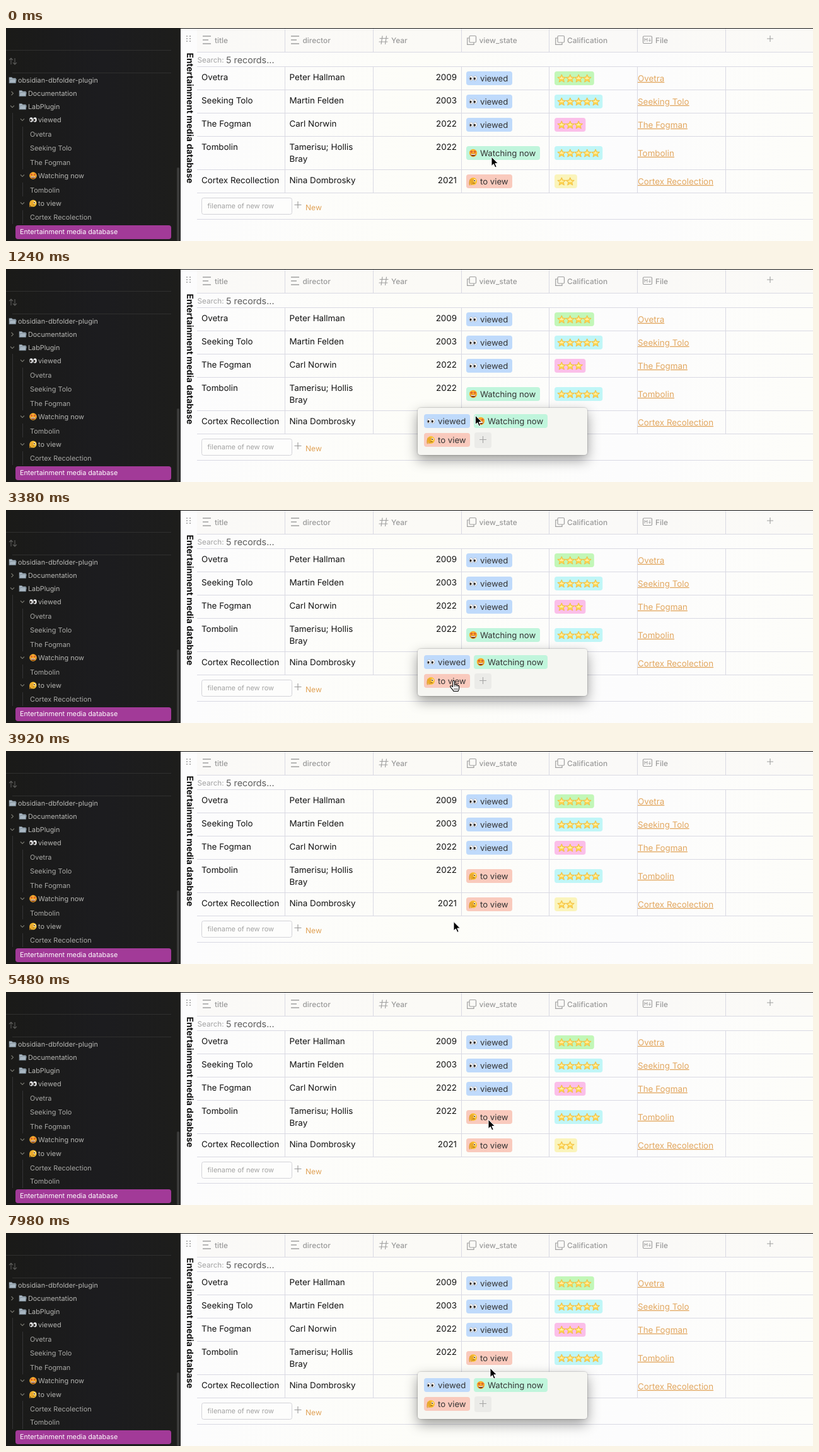
Animation, 1280 px wide and 339 px high, one loop 8 s. Source, as an HTML page:

```html
<!DOCTYPE html>
<html lang="en">
<head>
<meta charset="utf-8">
<title>Media database</title>
<style>
  html, body { margin: 0; width: 100%; height: 100%; overflow: hidden; background: #fdfdfb; }
  svg { display: block; width: 1280px; height: 339px; }
  text { font-family: Inter, Roboto, sans-serif; text-rendering: geometricPrecision; white-space: pre; }
</style>
</head>
<body>
<svg id="stage" viewBox="0 0 1280 339" xmlns="http://www.w3.org/2000/svg">
  <defs>
    <linearGradient id="pane">
      <stop offset="0" stop-color="#fcfcfd"/><stop offset=".4" stop-color="#fdfdf8"/>
      <stop offset=".7" stop-color="#fcfcfd"/><stop offset="1" stop-color="#fdfdf9"/>
    </linearGradient>
    <linearGradient id="side">
      <stop offset="0" stop-color="#1a1a18"/><stop offset=".55" stop-color="#1c1c1f"/>
      <stop offset="1" stop-color="#1d1d1b"/>
    </linearGradient>
    <filter id="shade" x="-20%" y="-60%" width="140%" height="240%">
      <feDropShadow dx="0" dy="0" stdDeviation=".8" flood-color="#000" flood-opacity=".35"/>
      <feDropShadow dx="0" dy="8" stdDeviation="10" flood-color="#000" flood-opacity=".38"/>
    </filter>
    <g id="eyes">
      <g fill="#fff" stroke="#8b8f96" stroke-width=".5">
        <ellipse cx="-3.2" cy="0" rx="2.9" ry="4"/><ellipse cx="3.2" cy="0" rx="2.9" ry="4"/>
      </g>
      <ellipse cx="-4" cy=".6" rx="1.5" ry="2.1" fill="#2a2522"/>
      <ellipse cx="2.4" cy=".6" rx="1.5" ry="2.1" fill="#2a2522"/>
    </g>
    <path id="spark" d="M0-2.7.7-.9 2.7-.8 1.2.4 1.7 2.2 0 1.2-1.7 2.2-1.2.4-2.7-.8-.7-.9Z"/>
    <g id="wow">
      <circle r="6.2" fill="#fbb02c"/>
      <path d="M-4.2.9Q0 2 4.2.9Q3.8 5.2 0 5.2T-4.2.9Z" fill="#7a3516"/>
      <path d="M-3.7 1.3Q0 2.3 3.7 1.3L3.2 3H-3.2Z" fill="#fff"/>
      <use href="#spark" x="-2.7" y="-2" fill="#d9612b"/><use href="#spark" x="2.7" y="-2" fill="#d9612b"/>
    </g>
    <g id="peek">
      <circle r="6" fill="#fbc233"/>
      <ellipse cx="2.4" cy="-1.2" rx="1.7" ry="2" fill="#fff"/><circle cx="2.2" cy="-1" r="1.1" fill="#55300e"/>
      <path d="M-1 3.2Q.8 2.4 2.6 3.2" fill="none" stroke="#70400f"/>
      <path d="M-5.5 5.8Q-6.6 1-4.5-3M-3.2 5.6Q-3.8 0-2-4.2M-1 4.6Q-1.8 0 .2-3" fill="none" stroke="#dd9a2a" stroke-width="1.3" stroke-linecap="round"/>
    </g>
    <g id="star">
      <path d="M0-6.4 1.9-2.2 6.5-1.8 3 1.3 4.1 5.8 0 3.4-4.1 5.8-3 1.3-6.5-1.8-1.9-2.2Z" fill="#fdd651" stroke="#f0b63a" stroke-width=".8" stroke-linejoin="round"/>
      <path d="M0-3.6 1.2-1 4-.8 1.9 1 0 .8-1.9 1-4-.8-1.2-1Z" fill="#fff0a8"/>
    </g>
    <path id="folder" d="M-5.5-4.6H-1.3L0-3.1H5V4.6H-5.5ZM-4-1.4H6L4.9 4.6H-5.5Z" fill="#a9b7c2" stroke="#6f7d88" stroke-width=".6"/>
  </defs>
</svg>
<script>
const stage = document.getElementById('stage');
const LOOP = 8000, OPEN_1 = 420, CLOSE = 3720, MOVE = 4180, OPEN_2 = 7060;

const text = (x, mid, str, size, fill, extra = '') =>
  `<text x="${x}" y="${mid + size * 0.36}" font-size="${size}" fill="${fill}" ${extra}>${str}</text>`;
const rect = (x, y, w, h, fill, r = 0, extra = '') =>
  `<rect x="${x}" y="${y}" width="${w}" height="${h}" rx="${r}" fill="${fill}" ${extra}/>`;
const path = (d, color, width = 1, extra = '') =>
  `<path d="${d}" fill="none" stroke="${color}" stroke-width="${width}" ${extra}/>`;
const icon = (id, x, y, scale = 1) =>
  `<use href="#${id}" transform="translate(${x} ${y}) scale(${scale})"/>`;
const plus = (x, y, r, color) => path(`M${x - r} ${y}H${x + r}M${x} ${y - r}V${y + r}`, color, 1.1);

const STATES = {
  viewed: { label: 'viewed', icon: 'eyes', color: '#bfdafb', width: 73 },
  now: { label: 'Watching now', icon: 'wow', color: '#c0f5dc', width: 117 },
  later: { label: 'to view', icon: 'peek', color: '#f9cabd', width: 73 }
};

const tag = (key, x, mid) => {
  const s = STATES[key];
  return rect(x, mid - 11, s.width, 22, s.color, 4) + icon(s.icon, x + 11, mid) +
    text(x + 22, mid, s.label, 13.2, '#333');
};

const stars = (n, mid, color) => {
  let out = rect(870, mid - 11, 9 + n * 13.45, 22, color, 4);
  for (let i = 0; i < n; i++) out += icon('star', 881.3 + i * 13.45, mid + 0.3);
  return out;
};

// Sidebar
const chevron = (x, y, open) =>
  path(open ? `M${x - 3} ${y - 1.5}l3 3 3-3` : `M${x - 1.5} ${y - 3}l3 3-3 3`, '#77776f', 1.1);
const guide = (x, y1, y2) => path(`M${x + .5} ${y1}V${y2}`, '#343436');
const leaf = (y, name) => text(38, y, name, 10.9, '#a9a9a6');
const group = (key, y) => chevron(26, y, true) + icon(STATES[key].icon, 43, y, .93) +
  text(51, y, STATES[key].label, 10.9, '#b4b4b1');
const root = (x, y, name) => icon('folder', x - 8.5, y) + text(x, y, name, 10.8, '#b9b9b6');

function sidebar() {
  return rect(0, 0, 277, 339, 'url(#side)') + rect(275, 0, 2, 339, '#252525') +
    path('M0 35.5H262M10 71.5H262', '#30302f') +
    path('M8 58V48M5 51l3-3 3 3M14 48V58M11 55l3 3 3-3', '#5c5c5a', 1.1) +
    root(19, 83, 'obsidian-dbfolder-plugin') +
    chevron(10, 104, false) + root(35, 104, 'Documentation') +
    chevron(10, 125, true) + root(35, 125, 'LabPlugin') +
    guide(10, 135, 312) + guide(26, 157, 225) +
    group('viewed', 146) + leaf(169, 'Ovetra') + leaf(191, 'Seeking Tolo') + leaf(214, 'The Fogman') +
    group('now', 235) +
    `<g id="treeA">${guide(26, 246, 268) + leaf(258, 'Tombolin') + group('later', 279) +
      guide(26, 290, 312) + leaf(301, 'Cortex Recolection')}</g>` +
    `<g id="treeB">${group('later', 257) + guide(26, 267, 312) +
      leaf(280, 'Cortex Recolection') + leaf(301, 'Tombolin')}</g>` +
    rect(15, 314, 247, 22, '#a23a98', 4) +
    text(22, 324, 'Entertainment media database', 10.8, '#fff') +
    rect(271, 222, 4, 117, '#3a3a39', 2);
}

// Table
const ROWS = [
  { y: 78, tagY: 80, title: 'Ovetra', by: ['Peter Hallman'], year: 2009, state: 'viewed', n: 4, color: '#c2f7b8' },
  { y: 115.5, tagY: 117, title: 'Seeking Tolo', by: ['Martin Felden'], year: 2003, state: 'viewed', n: 5, color: '#c0f6f7' },
  { y: 152, tagY: 154, title: 'The Fogman', by: ['Carl Norwin'], year: 2022, state: 'viewed', n: 3, color: '#fbbfe9' },
  { y: 189, tagY: 199, title: 'Tombolin', by: ['Tamerisu; Hollis', 'Bray'], year: 2022, n: 5, color: '#c0f6f7' },
  { y: 242, tagY: 244, title: 'Cortex Recollection', file: 'Cortex Recolection', by: ['Nina Dombrosky'], year: 2021, state: 'later', n: 2, color: '#faf4bb' }
];

function header() {
  const ink = '#a0a0a0';
  const lines = x => path(`M${x} 13h13M${x} 19h9M${x} 25h13`, ink, 1.4);
  const copies = x => rect(x + 4, 12.5, 10.5, 10.5, 'none', 1.5, `stroke="${ink}" stroke-width="1.2"`) +
    path(`M${x + 4} 16H${x + .7}V26.3H${x + 11}V23`, ink, 1.2);
  let dots = '';
  for (let i = 0; i < 6; i++) dots += rect(286 + i % 2 * 5, 12 + (i >> 1) * 4, 2, 2, '#9a9a9a', 1);
  const label = (x, s) => text(x, 20, s, 11.9, '#9a9a9a', 'font-weight="500"');
  return dots + lines(312) + label(331, 'title') + lines(452) + label(470.5, 'director') +
    path('M597 12.5l-2 13.5M603.5 12.5l-2 13.5M592.5 16.5h14M591.5 22h14', ink, 1.2) + label(611, 'Year') +
    copies(731) + label(750.5, 'view_state') + copies(871) + label(890, 'Calification') +
    rect(1010.5, 13, 14, 11.5, 'none', 1.5, `stroke="${ink}" stroke-width="1.2"`) +
    path('M1013 21.5V16.5l2 2.5 2-2.5V21.5M1021 16.5V21M1019.3 19.4l1.7 1.8 1.7-1.8', ink, 1) +
    label(1030, 'File') + plus(1212, 17, 5, ink);
}

function table() {
  let out = rect(277, 0, 1003, 339, 'url(#pane)') + rect(303, 1, 977, 37, '#faf9f6', 0, 'fill-opacity=".6"');
  const line = '#d9d9e3';
  for (const y of [38, 61, 98, 135, 172, 225, 262, 304]) out += path(`M303 ${y + .5}H1280`, line);
  for (const x of [442, 582, 722, 861, 1001, 1141]) out += path(`M${x + .5} 1V38M${x + .5} 61V262`, line);
  out += header() +
    `<text transform="translate(287 39.5) rotate(90)" font-size="13.9" font-weight="700" fill="#111">Entertainment media database</text>` +
    text(303.5, 51, 'Search:', 11.7, '#a2a2a2') + text(349, 51, '5 records...', 14.3, '#5c5c5c');
  for (const r of ROWS) {
    out += text(310, r.y, r.title, 13.4, '#111') +
      r.by.map((s, i) => text(449.5, r.y + i * 19, s, 13.4, '#111')).join('') +
      text(715, r.y, r.year, 13.4, '#111', 'text-anchor="end"') +
      (r.state ? tag(r.state, 730, r.tagY)
        : `<g id="cellA">${tag('now', 730, r.tagY)}</g><g id="cellB">${tag('later', 730, r.tagY)}</g>`) +
      stars(r.n, r.tagY, r.color) +
      text(1002, r.tagY, r.file || r.title, 13.4, '#e2a75f', 'text-decoration="underline"');
  }
  return out + rect(310.5, 270.5, 143, 26, '#fdfdfc', 3, 'stroke="#d3d3d8"') +
    text(319.5, 283.5, 'filename of new row', 11, '#a3a3a3') +
    plus(463, 281.5, 5.5, '#999') + text(475, 286, 'New', 12.1, '#e0a256') +
    rect(0, 0, 1280, 1, '#111');
}

const popup = () => `<g id="popup">${
  rect(653, 221, 269, 75, '#f6f6f2', 5, 'filter="url(#shade)"') +
  tag('viewed', 663, 242) + tag('now', 742, 242) + tag('later', 663, 272) +
  rect(743, 260, 27, 25, '#ebebe8', 4) + plus(756.5, 271.5, 5.5, '#a5a5a5')}</g>`;

const pointers = () =>
  `<g id="arrow"><path d="M0 0V14.6L3.4 11.5 5.8 17 8.2 16 5.8 10.6H10.4Z" fill="#000" stroke="#fff" stroke-width="1" stroke-linejoin="round"/></g>
   <g id="hand"><path d="M-1.4 10V1.5Q-1.4 0 0 0T1.4 1.5V6.3Q3.6 5.3 4 7Q6 6.2 6.4 7.8Q8.6 7.4 8.6 9.4V12Q8.4 15 7 17H0Q-1.4 14.6-3.6 12.2Q-6.2 9.4-5 8.5Q-3.6 7.6-1.4 10Z" fill="#fff" stroke="#000" stroke-width="1.1" stroke-linejoin="round"/><path d="M1.4 6.3V9.5M4 7V9.8M6.4 7.8V10M1 12V15M3.3 12V15M5.6 12V15" stroke="#000" stroke-width=".8"/></g>`;

stage.insertAdjacentHTML('beforeend', table() + sidebar() + popup() + pointers());

// Pointer stops: time, x, y
const STOPS = [
  [0, 770, 205], [700, 769.5, 205], [950, 769.5, 205], [1600, 710, 271.5],
  [4050, 710, 271.5], [4450, 732, 253], [4700, 732, 253], [5400, 765, 203],
  [7300, 765, 203], [7900, 768, 215], [LOOP, 768, 215]
];

function pointerAt(t) {
  const i = STOPS.findIndex(s => s[0] > t);
  const [t0, x0, y0] = STOPS[i - 1], [t1, x1, y1] = STOPS[i];
  const p = (t - t0) / (t1 - t0), k = p * p * (3 - 2 * p);
  return [x0 + (x1 - x0) * k, y0 + (y1 - y0) * k];
}

const part = id => document.getElementById(id);
const show = (id, on) => part(id).setAttribute('display', on ? 'inline' : 'none');

function draw(now) {
  const t = now % LOOP;
  const open = (t >= OPEN_1 && t < CLOSE) || t >= OPEN_2;
  const [x, y] = pointerAt(t);
  const hover = open && x > 663 && x < 736 && y > 261 && y < 283;
  show('popup', open);
  show('cellA', t < CLOSE);
  show('cellB', t >= CLOSE);
  show('treeA', t < MOVE);
  show('treeB', t >= MOVE);
  show('arrow', !hover);
  show('hand', hover);
  for (const id of ['arrow', 'hand']) part(id).setAttribute('transform', `translate(${x} ${y})`);
}

const start = performance.now();
function tick() {
  draw(performance.now() - start);
  requestAnimationFrame(tick);
}
tick();
</script>
</body>
</html>
```
